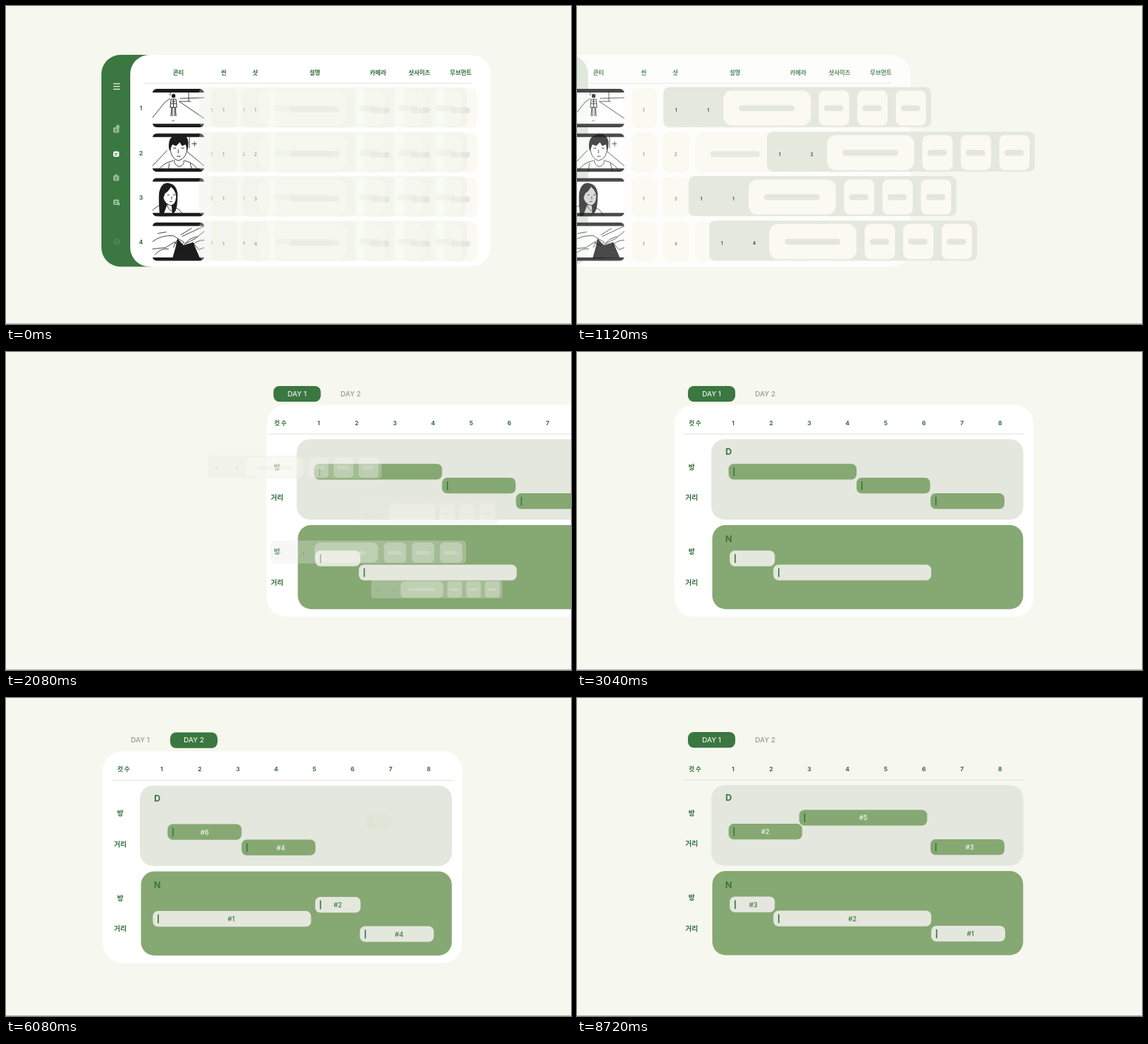
Write an HTML page with a canvas that moves like this. It is 764x430 px and loops after 8800 ms.

```html
<!DOCTYPE html>
<html lang="ko">
<head>
<meta charset="utf-8">
<title>Shot planner</title>
<style>
html, body { margin: 0; width: 100%; height: 100%; overflow: hidden; background: #f6f7ee; }
canvas { display: block; width: 100%; height: 100%; }
</style>
</head>
<body>
<canvas id="stage" width="764" height="430"></canvas>
<script>
const g = document.getElementById('stage').getContext('2d');
const LOOP = 8800;
const BG = '#f6f7ee', DEEP = '#3a7741', INK = '#2f6c38', LEAF = '#86a873', PALE = '#e4e7dd', CREAM = '#fafaf2', BLACK = '#1c1c1c';
const FONT = 'Inter, "Noto Sans CJK KR", "Noto Sans CJK", sans-serif';

const clamp = v => Math.max(0, Math.min(1, v));
const span = (t, a, b) => clamp((t - a) / (b - a));
const smooth = p => p * p * (3 - 2 * p);
const ease = (t, a, b) => smooth(span(t, a, b));
const mix = (a, b, p) => a + (b - a) * p;
const mixAll = (a, b, p) => a.map((v, i) => mix(v, b[i], p));

function box(x, y, w, h, r, color) {
  if (w <= 0 || h <= 0) return;
  g.fillStyle = color;
  g.beginPath();
  g.roundRect(x, y, w, h, r);
  g.fill();
}

function label(s, x, y, size, color, weight = 500) {
  g.font = `${weight} ${size}px ${FONT}`;
  g.textAlign = 'center';
  g.fillStyle = color;
  g.fillText(s, x, y + size * 0.36);
}

function faded(alpha, draw) {
  if (alpha <= 0) return;
  g.save();
  g.globalAlpha *= alpha;
  draw();
  g.restore();
}

function moved(x, y, draw) {
  g.save();
  g.translate(x, y);
  draw();
  g.restore();
}

function stroke(d, width = 0.8, color = BLACK) {
  g.strokeStyle = color;
  g.lineWidth = width;
  g.stroke(new Path2D(d));
}

function fill(d, color = BLACK) {
  g.fillStyle = color;
  g.fill(new Path2D(d));
}

// Storyboard sketches, each in a 70 x 52 box
const sketches = [
  () => {
    stroke('M0 39L17 18L24 13M37 13L70 12M36 17L70 40M24 4V9M49 4V17M36 17H52');
    fill('M26 10a2.6 2.6 0 1 1 5 0l-.5 2h-4z');
    stroke('M25 14h7l1 11h-9zM26 25l-1 12M31 25l1 12M28.5 14v11M26 17h5M25 20h7M27 25v12M30 25v12', 0.9);
    stroke('M26 43h4', 0.6);
  },
  () => {
    stroke('M0 44L20 23M46 24L70 44M50 5V20M57 11V18M53 14H60');
    fill('M7 52Q13 40 27 37H45Q57 40 63 52Z', '#fff');
    stroke('M7 52Q13 40 28 37M44 37Q57 40 63 52M29 36Q30 44 37 45Q43 43 43 36M23 40L21 52M51 40L54 52');
    fill('M24 17Q24 34 35 37Q47 34 47 17Z', '#fff');
    stroke('M24 18Q24 34 35 37Q47 34 47 18');
    fill('M23 24Q19 5 32 2Q39-1 45 4Q51 9 47 24L45 15L40 17L37 12L32 17L27 15Z');
    stroke('M28 20h4M39 20h4M35 22v5M33 31h5', 0.9);
  },
  () => {
    fill('M10 52Q8 30 9 20Q12 6 22 7Q33 9 34 22Q34 40 31 45L25 52Z');
    fill('M17 21Q22 18 25 12Q32 18 32 26Q31 36 25 37Q17 35 15 27Z', '#fff');
    fill('M20 36L26 38L27 52H14Z', '#fff');
    stroke('M20 23h3M28 23h3M26 25v4M23 32h4', 0.8);
    stroke('M0 44Q7 38 10 37M30 40Q38 42 42 52M20 37Q22 45 30 46');
  },
  () => {
    stroke('M0 26Q12 17 28 18L43 27L39 31L29 27M0 36L18 34L31 26M7 15L19 13M40 19L70 5M44 29L58 22L70 12M38 17L53 8M52 34Q58 24 70 24');
    fill('M34 22L42 31L55 27L64 48L27 49L31 35Z');
    stroke('M34 23L28 34M54 27L63 37L70 34M42 31L50 23L60 19M3 44Q12 34 22 36');
  }
];

const rowY = i => 110 + 60.2 * i;

function icon(y, color, kind) {
  moved(149, y, () => {
    g.globalAlpha *= kind === 4 ? 0.4 : 1;
    if (kind === 4) {
      stroke('M1-4L4.5-2V2L1 4L-2.5 2V-2Z', 1, color);
      stroke('M-.2 0a1.2 1.2 0 1 0 2.4 0a1.2 1.2 0 1 0-2.4 0', 0.8, color);
      return;
    }
    box(-4, -3.5, 8, 7.5, 2, color);
    if (kind === 0) box(0, -7, 4.5, 5, 2, color);
    if (kind === 2) box(-1.5, -5, 3, 2, 1, color);
    if (kind === 3) box(1.5, 1, 3.5, 3.5, 1, color);
    box(-2, -1, 4, 1, 0, DEEP);
    box(-2, 1.2, 3, 1, 0, DEEP);
  });
}

function table() {
  box(129, 66, 90, 286.5, 26, DEEP);
  box(168, 66, 487, 286.5, 26, '#fff');
  for (let i = 0; i < 3; i++) box(145, 104.5 + 3.7 * i, 9, 1.2, 0, '#f4f7ee');
  ['#9cbb9f', '#f4f7ee', '#9cbb9f', '#9cbb9f', '#9cbb9f'].forEach((c, i) => icon([167.5, 200, 232.5, 265, 319][i], c, i));

  const heads = [['콘티', 233], ['씬', 294.5], ['샷', 337], ['설명', 417.5], ['카메라', 503], ['샷사이즈', 559], ['무브먼트', 615]];
  heads.forEach(([s, x]) => label(s, x, 90.5, 8, INK, 700));
  box(186, 104, 443, 1, 0, '#e4e7dd');

  for (let i = 0; i < 4; i++) {
    const y = rowY(i);
    label(i + 1, 182.5, y + 28.5, 8, INK, 700);
    [[278, 34], [320, 36], [364, 110], [484, 42], [538, 44], [592, 45]].forEach(([x, w]) => box(x, y + 1, w, 54, 8, CREAM));
    label(1, 294, y + 31, 5.5, INK);
    label(i + 1, 337.5, y + 31, 5.5, INK);
    box(384, y + 26, 67, 8, 4, PALE);
    [492, 547, 601].forEach(x => box(x, y + 27, 26.5, 8, 4, PALE));

    moved(198, y + 2, () => {
      g.beginPath();
      g.roundRect(0, 0, 70, 52, 6);
      g.clip();
      box(0, 0, 70, 52, 0, '#fff');
      sketches[i]();
      box(0, 0, 70, 5, 0, BLACK);
      box(0, 47.3, 70, 5, 0, BLACK);
    });
  }
}

// Shot strips leave the table and shrink toward their bars
const strips = [
  { x: 117, shot: 1, mid: [273, 140, 235, 31], end: [205, 151, 173, 21] },
  { x: 257, shot: 2, mid: [358, 255, 264, 31], end: [207, 269, 61, 21] },
  { x: 151, shot: 1, mid: [477, 203, 188, 30], end: [478, 191, 100, 21] },
  { x: 179, shot: 4, mid: [494, 308, 177, 25], end: [265, 288, 214, 21] }
];

function strip(s, i, t) {
  const y = rowY(i) - 0.3;
  let r = mixAll([261, y, 362, 54], [s.x, y, 362, 54], ease(t, 60, 1100));
  r = mixAll(r, s.mid, ease(t, 1130, 2080));
  r = mixAll(r, s.end, ease(t, 2080, 2560));
  g.save();
  g.translate(r[0], r[1]);
  g.scale(r[2] / 362, r[3] / 54);
  box(0, 0, 362, 54, 8, '#e4e8dd');
  box(81, 4.5, 118, 47.5, 12, CREAM);
  box(102, 24.5, 75, 8, 4, PALE);
  for (let k = 0; k < 3; k++) {
    box(210 + 52 * k, 4.5, 41, 47.5, 8, CREAM);
    box(217 + 52 * k, 24.5, 26, 8, 4, PALE);
  }
  label(1, 17, 31, 5.5, '#28502e', 700);
  label(s.shot, 60.5, 31, 5.5, '#28502e', 700);
  g.restore();
}

function bar(x, y, w, night, text, textX = x + w / 2, textAlpha = 1) {
  box(x, y, w, 21.3, 7, night ? PALE : LEAF);
  box(x + 6.5, y + 4.7, 1.6, 12, 0.5, DEEP);
  if (text) faded(textAlpha, () => label(text, textX, y + 10.8, 9, night ? DEEP : '#f4f6ee'));
}

function tabs(day2) {
  [150, 222.5].forEach((x, i) => {
    const on = i ? day2 : 1 - day2;
    faded(on, () => box(x, 46, 64, 21.3, 8, DEEP));
    faded(1 - on, () => label('DAY ' + (i + 1), x + 32, 56.3, 9.5, '#979b90'));
    faded(on, () => label('DAY ' + (i + 1), x + 32, 56.3, 9.5, '#eef3e6'));
  });
}

function dayOne(t) {
  const text = ease(t, 3160, 3560);
  const go = ease(t, 3760, 4400);
  if (go < 1) {
    const [x, y, w] = mixAll([205, 151.2, 173], [479, 308, 100], go);
    bar(x, y, w, false, '#1', x + w / 2, text);
  }
  bar(mix(378, 205, ease(t, 4260, 4760)), 170, 99.5, false, '#2', undefined, text);
  bar(478, 191, 100, false, '#3', 531, text);
  const late = t > 6000;
  bar(206.5, 268.5, 61, true, '#3', late ? 238.5 : 236.5, text);
  bar(265.5, 287.5, 213.5, true, '#2', late ? 372.5 : 378, text);
}

function dayTwo(t) {
  const out = ease(t, 5640, 6140);
  faded(1 - out, () => bar(mix(417, 490, out), mix(151.2, 157, out), mix(173, 30, out), false, '#5', 504, 1 - out));
  bar(219, 170, 100, false, '#6');
  bar(319, 191, 100, false, '#4', 372);
  bar(418.5, 268.5, 61.5, true, '#2');
  bar(199, 287.5, 214, true, '#1', 305);
}

function schedule(t) {
  const day2 = span(t, 4960, 5360) * (1 - span(t, 6600, 7160));
  const tab = ease(t, 5160, 5400) * (1 - ease(t, 6640, 6960));
  const slide = 633 * Math.pow(1 - span(t, 1500, 2800), 1.85);
  const settle = 0.5 * day2;
  moved(slide - settle, settle, () => {
    const card = t < 4900 ? 1 - ease(t, 3200, 3800) : day2;
    faded(card, () => box(131.5 + slide * 0.044, 71.5, 486, 286.5, 26, '#fff'));
    tabs(tab);
    label('컷 수', 159.5, 96, 8, INK, 700);
    for (let i = 0; i < 8; i++) label(i + 1, 211 + 51.6 * i, 96, 8, INK, 700);
    box(144, 110.5, 460.5, 1, 0, '#dfe4d6');
    [['방', 155.5], ['거리', 197], ['방', 270], ['거리', 311.5]].forEach(([s, y]) => label(s, 155, y, 9.3, INK, 700));

    faded(1 - 0.75 * day2 * (1 - day2), () => {
      box(181.5, 118, 422, 108.7, 18, PALE);
      box(183, 234, 420.3, 113.7, 18, LEAF);
    });
    faded(ease(t, 2320, 2900), () => {
      label('D', 205, 135, 12, DEEP, 700);
      label('N', 205, 252.5, 12, DEEP, 700);
    });
    faded(1 - day2, () => dayOne(t));
    faded(day2, () => dayTwo(t));
    faded(ease(t, 4080, 4400), () => bar(479, 308, 100, true, day2 > 0.5 ? '#4' : '#1', 532));
    faded(ease(t, 6840, 7240), () => {
      const x = mix(417, 300.5, ease(t, 7640, 8440));
      bar(x, 151.2, 173, false, '#5');
    });
  });
}

function frame(t) {
  g.globalAlpha = 1;
  box(0, 0, 764, 430, 0, BG);
  faded(1 - span(t, 1040, 1440), () => moved(-204 * ease(t, 40, 1080), 0, table));
  if (t > 1500) schedule(t);
  const show = mix(0.33, 1, ease(t, 0, 480)) * (1 - span(t, 1500, 2340));
  strips.forEach((s, i) => faded(show, () => strip(s, i, t)));
  box(0, 429, 764, 1, 0, '#b4b5b0');
}

function tick() {
  frame(performance.now() % LOOP);
  requestAnimationFrame(tick);
}
tick();
</script>
</body>
</html>
```
